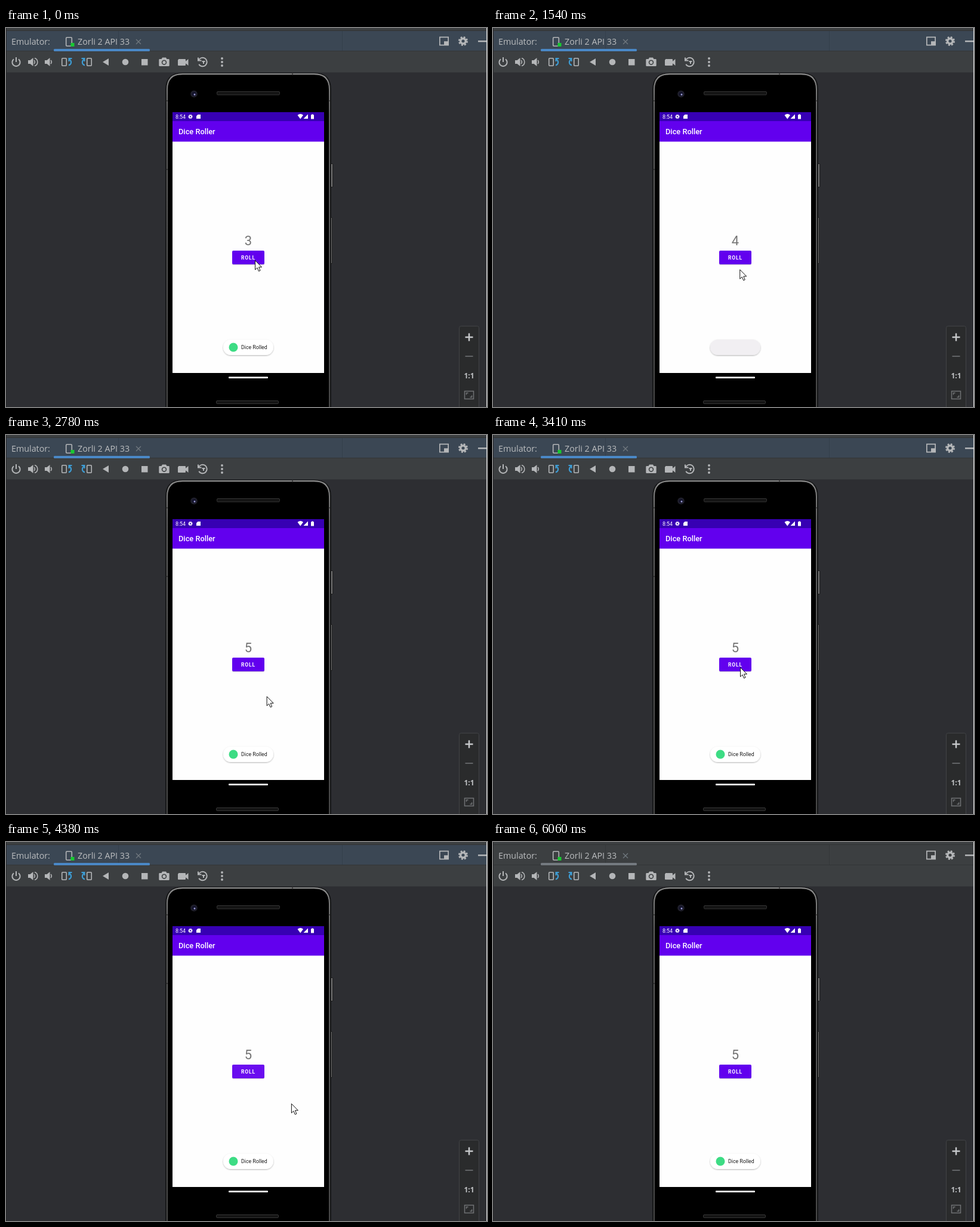
An HTML page that plays this animation: 806 by 635 pixels, repeating every 6160 ms.

```html
<!DOCTYPE html>
<html lang="en">
<head>
<meta charset="utf-8">
<title>Dice Roller</title>
<style>
  html, body { margin: 0; width: 100%; height: 100%; overflow: hidden; background: #2d2e32; }
  svg { display: block; width: 806px; height: 635px; }
  .ide { font: 14.3px "Open Sans", "Noto Sans", sans-serif; fill: #bbbdbf; }
  .app { font-family: Roboto, sans-serif; }
  .medium { font-weight: 500; fill: #fff; }
  .icons { fill: #b4b6b8; }
  .line { fill: none; stroke: #b4b6b8; stroke-width: 2; }
  .thin { stroke-width: 1.6; }
  .blue { fill: none; stroke: #3d9fd8; stroke-width: 2; }
</style>
</head>
<body>
<svg viewBox="0 0 806 635">
  <defs>
    <linearGradient id="metal" x1="0" y1="0" x2="0" y2="1">
      <stop offset="0" stop-color="#8c8c8c"/>
      <stop offset=".12" stop-color="#626262"/>
      <stop offset="1" stop-color="#484848"/>
    </linearGradient>
    <filter id="soft" x="-20%" y="-30%" width="140%" height="180%">
      <feDropShadow dx="0" dy="1" stdDeviation=".9" flood-opacity=".3"/>
    </filter>
    <g id="gear" fill="none">
      <circle r="4.3" stroke-width="3.4"/>
      <circle r="6.5" stroke-width="3" stroke-dasharray="2.8 2.305"/>
    </g>
    <path id="speaker" d="M0 -3h3.5l5 -4v14l-5 -4h-3.5z"/>
    <rect id="device" x="-3.75" y="-6.25" width="7.500" height="12.500" rx="1"/>
    <circle id="dot" r="1.9"/>
  </defs>

  <!-- window bars -->
  <rect width="806" height="74" fill="#3c3f41"/>
  <path d="M0 4.5H806" stroke="#323435"/>
  <rect id="bar" x="1" y="5" width="804" height="33"/>
  <path d="M0 38.5H806" stroke="#323537"/>
  <path d="M188.5 5v30M563.5 5v33" stroke="#000" opacity=".1"/>
  <rect id="underline" x="80" y="35" width="161" height="4" rx="1.5"/>
  <path d="M0 74.5H806" stroke="#333538"/>
  <path d="M.5 0V635" stroke="#242528"/>
  <path d="M805.5 0V635" stroke="#e8e8e8"/>

  <g class="ide">
    <text x="9" y="28">Emulator:</text>
    <text x="120" y="28">Zorli 2 API 33</text>
  </g>
  <rect class="line thin" x="100.7" y="15.7" width="9.6" height="14.6" rx="1.5"/>
  <rect x="108.5" y="25" width="6" height="6" fill="#19c932"/>
  <path d="M218 19l8 8m0 -8l-8 8" fill="none" stroke="#71797f" stroke-width="1.3"/>

  <g class="icons">
    <path fill-rule="evenodd" d="M726 14.500h16v15h-16zM727.700 16.200v11.600h6.300v-5.600h6.300v-6z"/>
    <use href="#gear" x="766" y="22" stroke="#b4b6b8"/>
    <rect x="791" y="21" width="14" height="2.500"/>
  </g>

  <!-- emulator toolbar -->
  <g class="icons">
    <path class="line" d="M13 52.200a6.600 6.600 0 1 0 8 0M17 49v8"/>
    <use href="#speaker" x="37" y="57"/>
    <path class="line thin" d="M47 54a4 4 0 0 1 0 6M48 50.500a6.800 6.800 0 0 1 0 13"/>
    <use href="#speaker" x="65" y="57"/>
    <path class="line thin" d="M75 54a4 4 0 0 1 0 6"/>
    <use href="#device" class="line thin" x="97.500" y="57"/>
    <path class="blue" d="M105 62.500c5 -1.500 5.500 -7 1.500 -10M110.500 51h-5v5"/>
    <use href="#device" class="line thin" x="139.500" y="57"/>
    <path class="blue" d="M132 62.500c-5 -1.500 -5.500 -7 -1.500 -10M126.500 51h5v5"/>
    <path d="M162 57l10 -6v12z"/>
    <circle cx="200" cy="57" r="5.300"/>
    <rect x="227" y="52" width="10.500" height="10.500"/>
    <path fill-rule="evenodd" d="M257.500 52h3l1.500 -2.500h6l1.500 2.500h3q1.200 0 1.200 1.200v9.600q0 1.200 -1.200 1.200h-15q-1.200 0 -1.200 -1.200v-9.600q0 -1.200 1.200 -1.200zM265 53.500a4.200 4.200 0 1 0 .01 0z"/>
    <circle cx="265" cy="57.700" r="2.600"/>
    <path d="M289 52h11q1 0 1 1v2.700l4.500 -3.700v11l-4.500 -3.700v2.700q0 1 -1 1h-11q-1 0 -1 -1v-8q0 -1 1 -1z"/>
    <path class="line" d="M323 53.500a7.300 7.300 0 1 1 .2 7.400M322 49.500v5h5.500M328.500 56h5M331 56v4"/>
    <use href="#dot" x="362" y="51"/>
    <use href="#dot" x="362" y="57"/>
    <use href="#dot" x="362" y="63"/>
  </g>

  <!-- phone -->
  <g>
    <path d="M544 227.500h3.500v39h-3.500zM544 317.500h2.500v77h-2.500z" fill="#777" stroke="#1c1c1c"/>
    <path d="M267 640V103q0 -28 28 -28h222q28 0 28 28V640z" fill="#161718"/>
    <path d="M270 640V103q0 -26 26 -26h220q26 0 26 26V640z" stroke="url(#metal)" stroke-width="2"/>
    <path d="M276 83q6 -5.500 20 -5.500h220q14 0 20 5.500" fill="none" stroke="#888" stroke-width="1.500"/>
    <path d="M267 122h5M540 122h5M267 237h5M480 75v5" stroke="#1b1b1b"/>
    <circle cx="315" cy="110.500" r="5.800" fill="#20202c"/>
    <circle cx="315" cy="110.500" r="3.300" fill="#13132c"/>
    <circle cx="316" cy="111.500" r="1.400" fill="#9b9bd0"/>
    <g fill="#141414" stroke="#343434">
      <rect x="353.500" y="106.500" width="105" height="5.500" rx="1.500"/>
      <rect x="352.500" y="624.500" width="104" height="5" rx="1.500"/>
    </g>
    <rect x="373" y="584.300" width="66" height="2.700" rx="1" fill="#fff"/>
  </g>

  <!-- app screen -->
  <g class="app">
    <rect x="279" y="141" width="254" height="437" fill="#fefefe"/>
    <rect x="279" y="141" width="254" height="15" fill="#3700b3"/>
    <rect x="279" y="156" width="254" height="34.400" fill="#6200ee"/>
    <g fill="#fff">
      <text x="284" y="152" font-size="8.800">8:54</text>
      <use href="#gear" transform="translate(309 148.500) scale(.46)" stroke="#fff"/>
      <path d="M321.500 145h4.500v7h-7v-4.500zM488.500 146q5 -4 9.500 0l-4.700 6.500zM506 144.500v7.500h-7.500zM511 145.500h1.300v-1h2.400v1h1.300v7h-5z"/>
    </g>
    <text class="medium" x="289" y="178" font-size="12.800">Dice Roller</text>
    <text id="number" x="406" y="363.500" font-size="22" text-anchor="middle" fill="#757575"></text>
    <rect x="379" y="374" width="54" height="23" rx="2" fill="#000" opacity=".18"/>
    <rect x="379" y="373" width="54" height="23" rx="2" fill="#6200ee"/>
    <rect id="ripple" x="379" y="373" width="54" height="23" rx="2" fill="#fff"/>
    <text class="medium" x="394" y="388" font-size="8.500" letter-spacing=".9" style="font-weight:700">ROLL</text>

    <g id="toast">
      <rect id="pill" x="364" y="522" width="84" height="26" rx="13" filter="url(#soft)"/>
      <g id="message">
        <circle cx="381" cy="535" r="7.500" fill="#3ddc84"/>
        <text x="394" y="538.200" font-size="8.800" fill="#1c1c1c">Dice Rolled</text>
      </g>
    </g>
  </g>

  <!-- zoom panel -->
  <rect x="759.500" y="499.500" width="33" height="140" rx="3" fill="#2a2b2c" stroke="#424447"/>
  <path d="M769.500 518h13M776 511.500v13" stroke="#c6c8ca" stroke-width="2.500"/>
  <path d="M769.500 550h13" stroke="#626466" stroke-width="2"/>
  <text x="776" y="587" text-anchor="middle" font-family="Open Sans, sans-serif" font-weight="700" font-size="12" fill="#c0c2c4">1:1</text>
  <path d="M768.500 608.500h15v13h-15zM771.500 614.500v-3h3M780.500 615.500v3h-3" fill="none" stroke="#707274" stroke-width="1.500"/>

  <path id="cursor" d="M.5 .5V16L4 12.700L6.500 18.500L9 17.400L6.600 11.700H11.500z" fill="#fff" stroke="#111" stroke-linejoin="round"/>
</svg>

<script>
const LOOP = 6160;
const BLUR_TIME = 6060;
const $ = id => document.getElementById(id);
const set = (id, name, value) => $(id).setAttribute(name, value);
const clamp = v => Math.min(1, Math.max(0, v));

const presses = [{ time: 390, value: 4 }, { time: 2090, value: 5 }, { time: 3840, value: 5 }];
const toastSwaps = [1240, 3690];

// Pointer trips, each eased from where the last one ended
const home = { x: 417, y: 389 };
const trips = [
  { from: 560, to: 1100, x: 452, y: 452 },
  { from: 1390, to: 1600, x: 404, y: 393 },
  { from: 2600, to: 2930, x: 461, y: 471 },
  { from: 2990, to: 3400, x: 414, y: 389 },
  { from: 4250, to: 4650, x: 668, y: 584 },
  { from: 4650, to: 4900, x: 667, y: 640 }
];

const lastBefore = (list, t) => list.findLast(item => (item.time ?? item) <= t);

function pointerAt(t) {
  let { x, y } = home;
  for (const trip of trips) {
    const p = clamp((t - trip.from) / (trip.to - trip.from));
    const eased = p * p * (3 - 2 * p);
    x += (trip.x - x) * eased;
    y += (trip.y - y) * eased;
  }
  return [x, y];
}

function drawButton(t) {
  const press = lastBefore(presses, t);
  const age = press ? t - press.time : Infinity;
  const ripple = .2 * clamp(age / 150) * clamp((630 - age) / 360);
  set("ripple", "opacity", ripple);
  $("number").textContent = lastBefore(presses, t - 130)?.value ?? 3;
}

// The old toast fades, then an empty pill appears and its message follows.
function drawToast(t) {
  const age = t - (lastBefore(toastSwaps, t) ?? -LOOP);
  const message = age < 150 ? .35 : clamp((age - 370) / 140);
  const gone = age >= 150 && age < 300;
  set("toast", "opacity", gone ? 0 : 1);
  set("pill", "fill", age >= 300 && age < 400 ? "#f1eff2" : "#fff");
  set("message", "opacity", message);
}

function draw(t) {
  const focused = t < BLUR_TIME;
  set("bar", "fill", focused ? "#3b4754" : "#3c3f41");
  set("underline", "fill", focused ? "#4a88c7" : "#747a80");
  set("cursor", "transform", `translate(${pointerAt(t)})`);
  drawButton(t);
  drawToast(t);
}

const start = performance.now();
function tick() {
  draw((performance.now() - start) % LOOP);
  requestAnimationFrame(tick);
}
tick();
</script>
</body>
</html>
```
